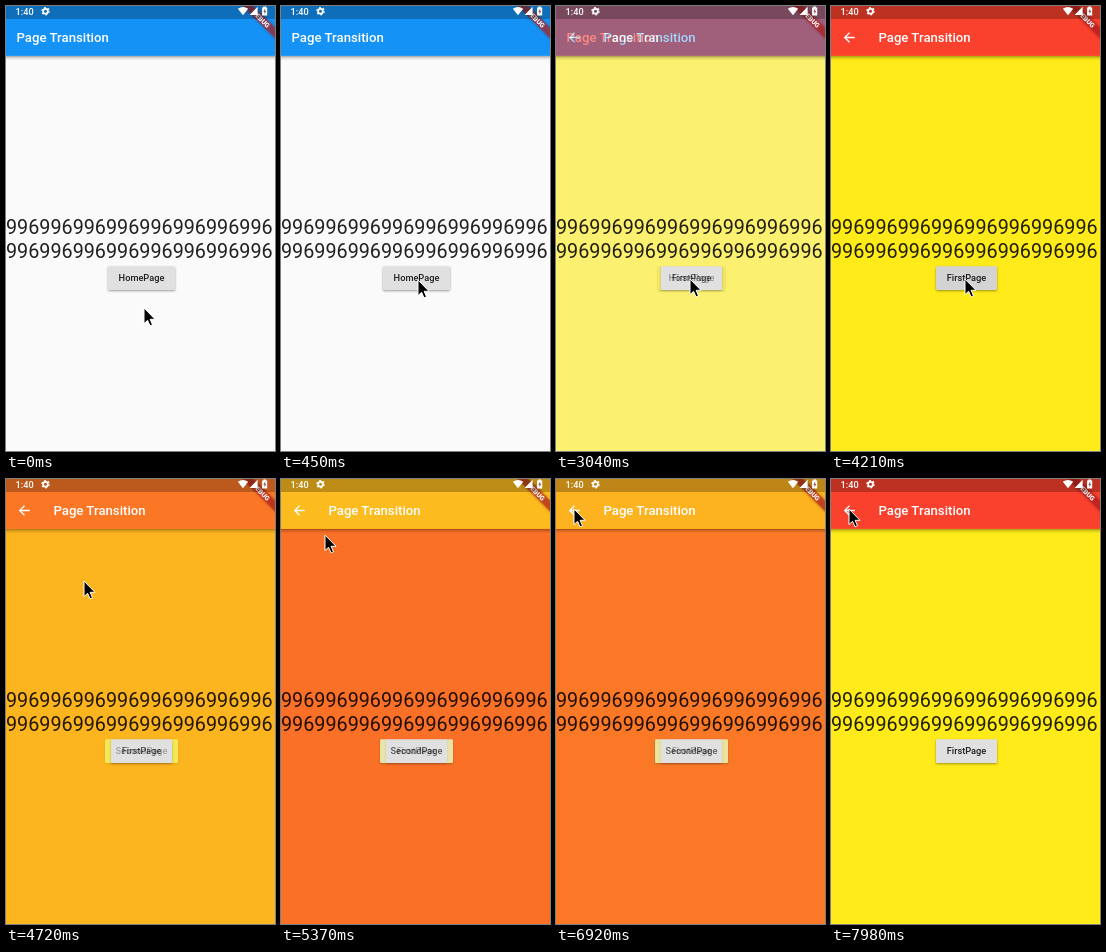
These frames come from a looping animation (269 px wide and 445 px high, 8000 ms). An HTML page:

```html
<!DOCTYPE html>
<html lang="en">
<head>
<meta charset="utf-8">
<title>Page Transition</title>
<style>
  html, body { margin: 0; width: 100%; height: 100%; overflow: hidden; }
  svg { display: block; width: 269px; height: 445px; font-family: Roboto, sans-serif; }
  .title { font-size: 13.2px; font-weight: 500; fill: #fff; }
  .body { font-size: 19.78px; fill: rgba(0, 0, 0, .87); }
  .label { font-size: 9.23px; font-weight: 500; fill: rgba(0, 0, 0, .87); text-anchor: middle; }
  .clock { font-size: 9.2px; font-weight: 500; fill: #fff; }
  .debug { font-size: 6.7px; font-weight: 900; fill: #fff; text-anchor: middle; }
</style>
</head>
<body>
<svg viewBox="0 0 269 445">
  <defs>
    <linearGradient id="shade" x2="0" y2="1">
      <stop offset="0" stop-opacity=".36"/>
      <stop offset=".4" stop-opacity=".14"/>
      <stop offset="1" stop-opacity="0"/>
    </linearGradient>
    <filter id="raise" x="-10%" y="-20%" width="120%" height="150%">
      <feDropShadow dx="0" dy="1" stdDeviation=".8" flood-opacity=".38"/>
    </filter>
    <filter id="soft" x="-20%" y="-60%" width="140%" height="220%">
      <feDropShadow dx="0" dy="0" stdDeviation="1.4" flood-opacity=".45"/>
    </filter>
  </defs>
  <g id="pages"></g>
  <g transform="translate(271 -2.8) rotate(45)">
    <rect x="-26.4" y="18.5" width="52.8" height="7.9" fill="#b71c1c" fill-opacity=".63" filter="url(#soft)"/>
    <text class="debug" x="0" y="24.8">DEBUG</text>
  </g>
  <rect width="269" height="13" fill-opacity=".25"/>
  <g fill="#fff">
    <text class="clock" x="9.5" y="8.6">1:40</text>
    <circle cx="39.5" cy="5.2" r="2.4" fill="none" stroke="#fff" stroke-width="1.7"/>
    <circle cx="39.5" cy="5.2" r="3.6" fill="none" stroke="#fff" stroke-width="1.3" stroke-dasharray="1.9 1.87"/>
    <path d="M231.8 2.8Q237 -.6 242.2 2.8L237 9.2Z"/>
    <path d="M251.6 .8V9H243.6Z"/>
    <path d="M257.3 .6H260V1.5H261.2V9.4H256.1V1.5H257.3Z"/>
    <path d="M259.2 2.6L257.3 5.8H258.5V8.2L260.2 5H259.2Z" fill="#8a5050"/>
  </g>
  <path id="cursor" d="M0 0V15.6L3.6 12.3L6 17.8L8.5 16.7L6.1 11.3H11Z" fill="#000" stroke="#fff" stroke-width="1"/>
</svg>
<script>
const LOOP = 8000;
const RED = '#fa412d', YELLOW = '#feeb19';
const DIGITS = '996'.repeat(8);

function page(name, bar, back, width, hasBack) {
  const x = 135.5 - width / 2;
  const box = `x="${x}" y="260.3" width="${width}" height="23.7" rx="1.3"`;
  const arrow = '<path d="M23.8 31.5H13.9M18.5 26.7L13.7 31.5L18.5 36.3" fill="none" stroke="#fff" stroke-width="1.3"/>';
  return `<g class="page">
    <rect width="269" height="445" fill="${back}"/>
    <rect y="49.9" width="269" height="4.6" fill="url(#shade)"/>
    <rect width="269" height="49.9" fill="${bar}"/>
    ${hasBack ? arrow : ''}
    <text class="title" x="${hasBack ? 47.4 : 10.5}" y="36.2">Page Transition</text>
    <text class="body" x="0" y="228.4">${DIGITS}</text>
    <text class="body" x="0" y="251.6">${DIGITS}</text>
    <rect ${box} fill="#e0e0e0" filter="url(#raise)"/>
    <rect class="press" ${box} opacity="0"/>
    <text class="label" x="135.5" y="275.2">${name}</text>
  </g>`;
}

document.getElementById('pages').innerHTML =
  page('HomePage', '#1492f6', '#fafafa', 67, false) +
  page('FirstPage', RED, YELLOW, 61, true) +
  page('SecondPage', YELLOW, RED, 73, true);

const [, first, second] = document.querySelectorAll('.page');
const press = document.querySelectorAll('.press');
const cursor = document.getElementById('cursor');

// time, x, y
const path = [
  [30, 138, 302], [450, 137, 274], [1100, 137, 274], [1340, 134, 273],
  [4340, 134, 273], [4720, 78, 102], [5370, 44, 56], [5820, 19, 33], [6020, 18, 30]
];

const ramp = (t, a, b) => Math.min(1, Math.max(0, (t - a) / (b - a)));

function cursorAt(t) {
  let [, x, y] = path[0];
  for (let i = 1; i < path.length; i++) {
    const [t0, x0, y0] = path[i - 1], [t1, x1, y1] = path[i];
    const k = ramp(t, t0, t1);
    x += (x1 - x0) * k;
    y += (y1 - y0) * k;
  }
  return `translate(${Math.round(x)} ${Math.round(y)})`;
}

const pressAt = (t, start) => t < start ? 0 : .06 * (1 - ramp(t, start + 150, start + 450));

function draw(t) {
  first.setAttribute('opacity', ramp(t, 2070, 3670));
  second.setAttribute('opacity', ramp(t, 4210, 5820) - ramp(t, 6400, 7980));
  press[0].setAttribute('opacity', pressAt(t, 1970));
  press[1].setAttribute('opacity', pressAt(t, 4210));
  cursor.setAttribute('transform', cursorAt(t));
}

const start = performance.now();
function tick() {
  draw((performance.now() - start) % LOOP);
  requestAnimationFrame(tick);
}
tick();
</script>
</body>
</html>
```
